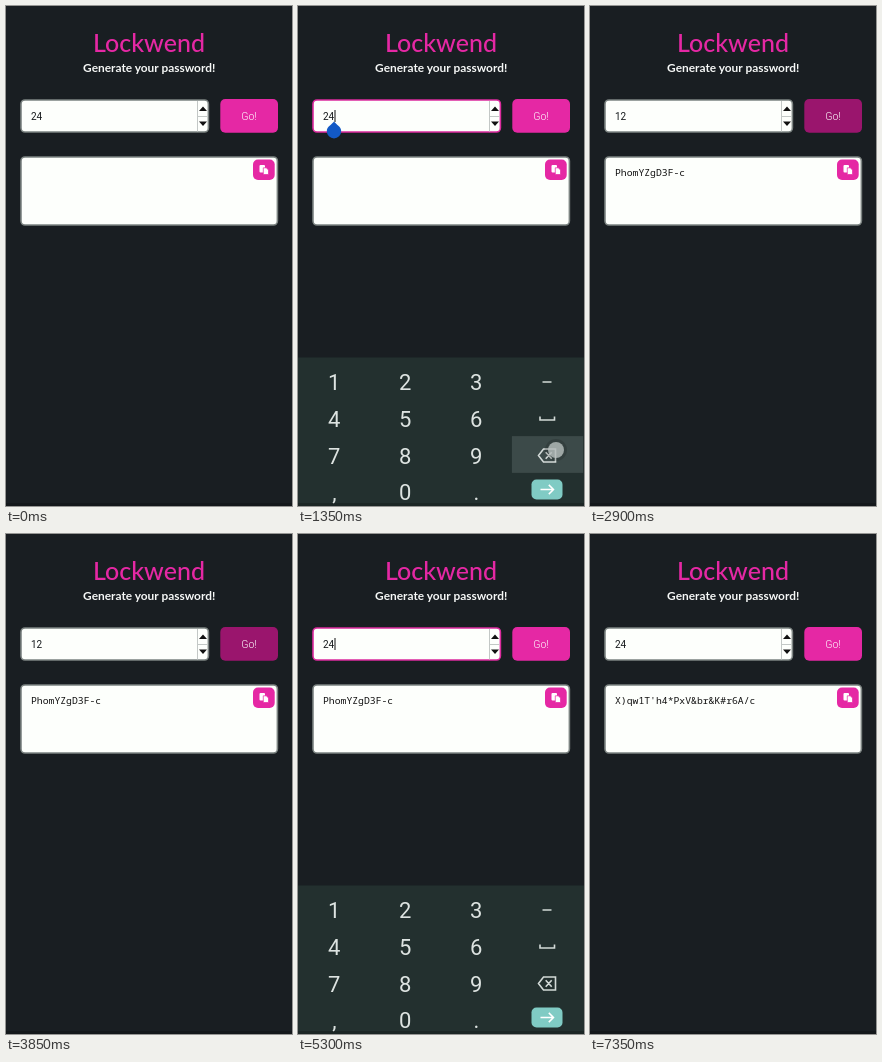
Animation, 286 px wide and 500 px high, one loop 7500 ms. Source, as an HTML page:

```html
<!DOCTYPE html>
<html lang="en">
<head>
<meta charset="utf-8">
<title>Password generator</title>
<style>
  :root { --loop: 7.5s; --pink: #e528a4; --dark: #9a156d; --paper: #fdfffc; }
  html, body { margin: 0; width: 100%; height: 100%; overflow: hidden; background: #191e22; }
  svg { display: block; width: 100vw; height: 100vh; }
  text { white-space: pre; }
  .title { font: 500 25px Lato, sans-serif; fill: var(--pink); }
  .tagline { font: 700 11.9px Lato, sans-serif; fill: #f6f8f7; }
  .middle { text-anchor: middle; }
  .field { fill: var(--paper); stroke: #7c8482; stroke-width: 1.6; }
  .field.focus { stroke: #dc2b9e; }
  .value { font: 400 10px Roboto, sans-serif; fill: #15191b; }
  .result { font: 400 9.75px "Noto Sans Mono", monospace; fill: #111; }
  .go { fill: var(--pink); animation: hover var(--loop) linear infinite; }
  .go-label { font: 300 10.5px Roboto, sans-serif; fill: #fff; }
  .keyboard { animation: slide var(--loop) infinite; }
  .keys { font: 400 22px Roboto, sans-serif; fill: #dde3e1; }
  .icon { fill: none; stroke: #d3dad8; stroke-width: 1.6; }
  .tap { opacity: 0; animation: tap var(--loop) linear infinite; }
  .press { opacity: 0; fill: #3c4a49; animation: press var(--loop) step-end infinite; }

  @keyframes tap {
    0% { opacity: 0; }
    .5%, 2% { opacity: 1; }
    3.6%, 100% { opacity: 0; }
  }
  @keyframes press {
    0% { opacity: 1; }
    1.7%, 100% { opacity: 0; }
  }
  @keyframes slide {
    0%, 10.9% { transform: translateY(150px); animation-timing-function: ease-out; }
    13.3%, 32.7% { transform: none; animation-timing-function: ease-in; }
    35.3%, 53.2% { transform: translateY(150px); animation-timing-function: ease-out; }
    55.9%, 75.3% { transform: none; animation-timing-function: ease-in; }
    78%, 100% { transform: translateY(150px); }
  }
  @keyframes hover {
    0%, 31.6% { fill: var(--pink); }
    33%, 52.3% { fill: var(--dark); }
    53.7%, 74.6% { fill: var(--pink); }
    76%, 88.4% { fill: var(--dark); }
    89.8%, 100% { fill: var(--pink); }
  }
</style>
</head>
<body>
<svg viewBox="0 0 286 500" preserveAspectRatio="none">
  <rect width="286" height="500" fill="#191e22"/>
  <text class="title middle" x="143" y="46">Lockwend</text>
  <text class="tagline middle" x="143.2" y="65.5">Generate your password!</text>

  <rect class="field" id="input" x="15" y="94" width="187.4" height="32" rx="4"/>
  <path d="M191.5 95V125.5M192 110.5H201.500" stroke="#c3c8c6" fill="none"/>
  <path d="M193 105l4-4.600 4 4.600zM193 115.500l4 4.400 4-4.400z" fill="#111"/>
  <text class="value" id="value" x="25" y="113.700"></text>
  <rect id="caret" y="104" width="1" height="12" fill="#111"/>

  <rect class="go" x="214.300" y="93" width="57.700" height="33.700" rx="5"/>
  <text class="go-label middle" x="243" y="113.700">Go!</text>

  <rect class="field" x="15" y="151" width="256.400" height="68" rx="4"/>
  <text class="result" id="result" x="25" y="170"></text>
  <rect x="247" y="153.500" width="21.700" height="20.500" rx="5" fill="#e528a4"/>
  <rect x="253.500" y="159" width="5.500" height="7.500" rx="1" fill="#fff"/>
  <path d="M257.300 161.800h3l2.200 2.200v4.500h-5.200z" fill="#fff" stroke="#e528a4" stroke-width=".7"/>

  <path id="handle" d="M36 115.500c2 3 7.200 5 7.200 9.700a7.200 7.200 0 0 1-14.400 0c0-4.700 5.200-6.700 7.200-9.700z" fill="#1259c6"/>

  <g class="keyboard">
    <rect y="351.500" width="286" height="149" fill="#23302f"/>
    <g id="presses"></g>
    <g class="keys middle" id="keys"></g>
    <path class="icon" d="M244.500 376H253.500M242 410.500V414H256.500V410.500"/>
    <path class="icon" stroke-width="1.300" d="M240.500 449.500l5-6.500h12v13h-12zM247.700 446.200l6 6.600M253.700 446.200l-6 6.600"/>
    <rect x="233.500" y="473.500" width="31" height="20" rx="5" fill="#80cbc4"/>
    <path d="M242.500 483.500h13M250.800 478.900l4.700 4.600-4.700 4.600" fill="none" stroke="#fff" stroke-width="1.500"/>
  </g>
  <rect y="497" width="286" height="3" fill="#000" opacity=".2"/>
  <g id="taps"></g>
</svg>
<script>
const LOOP = 7500, BLINK = 250;
const $ = id => document.getElementById(id);

function add(parent, tag, attrs, text = '') {
  const node = document.createElementNS(parent.namespaceURI, tag);
  for (const name in attrs) node.setAttribute(name, attrs[name]);
  node.textContent = text;
  parent.append(node);
  return node;
}

['123', '456', '789', ',0.'].forEach((row, r) =>
  [...row].forEach((key, c) =>
    add($('keys'), 'text', { x: 36.3 + 71 * c, y: 384 + 36.8 * r }, key)));

// Time, x, y of each touch
const taps = [
  [700, 105, 111], [1290, 258, 444], [1460, 258, 445], [1640, 42, 377], [1800, 118, 375], [2330, 245, 111],
  [3900, 105, 111], [4500, 258, 444], [4660, 258, 445], [4860, 116, 376], [5030, 44, 412], [5570, 245, 111],
  [6600, 142, 273]
];
for (const [at, x, y] of taps) {
  const style = `animation-delay:${at}ms`;
  const tap = add($('taps'), 'g', { class: 'tap', style });
  add(tap, 'circle', { cx: x, cy: y, r: 11, fill: '#000', opacity: .15 });
  add(tap, 'circle', { cx: x, cy: y, r: 8, fill: '#b9c0bf', opacity: .8 });
  if (y > 352) {
    const col = Math.floor(x / 71.3), row = Math.floor((y - 357) / 36.8);
    add($('presses'), 'rect', { class: 'press', style, x: 71.3 * col, y: 356.5 + 36.8 * row, width: 71.3, height: 36.8 });
  }
}

const short = 'PhomYZgD3F-c', long = "X)qw1T'h4*PxV&br&K#r6A/c";
// Time, input value, focused, handle shown, generated password
const states = [
  [0, '24', 0, 0, ''], [750, '24', 1, 1, ''], [1400, '2', 1, 0, ''], [1550, '', 1, 0, ''],
  [1730, '1', 1, 0, ''], [1900, '12', 1, 0, ''], [2400, '12', 0, 0, short],
  [4000, '12', 1, 1, short], [4600, '1', 1, 0, short], [4760, '', 1, 0, short],
  [4950, '2', 1, 0, short], [5120, '24', 1, 0, short], [5640, '24', 0, 0, long]
];

const show = (node, on) => node.style.visibility = on ? 'visible' : 'hidden';
const start = performance.now();

function draw(now) {
  const t = Math.max(0, now - start) % LOOP;
  const [since, value, focused, handle, password] = states.findLast(s => s[0] <= t);
  $('value').textContent = value;
  $('result').textContent = password;
  $('input').classList.toggle('focus', !!focused);
  $('caret').setAttribute('x', 25.3 + 5.6 * value.length);
  show($('caret'), focused && Math.floor((t - since) / BLINK) % 2 === 0);
  show($('handle'), handle);
  requestAnimationFrame(draw);
}
draw(start);
</script>
</body>
</html>
```
